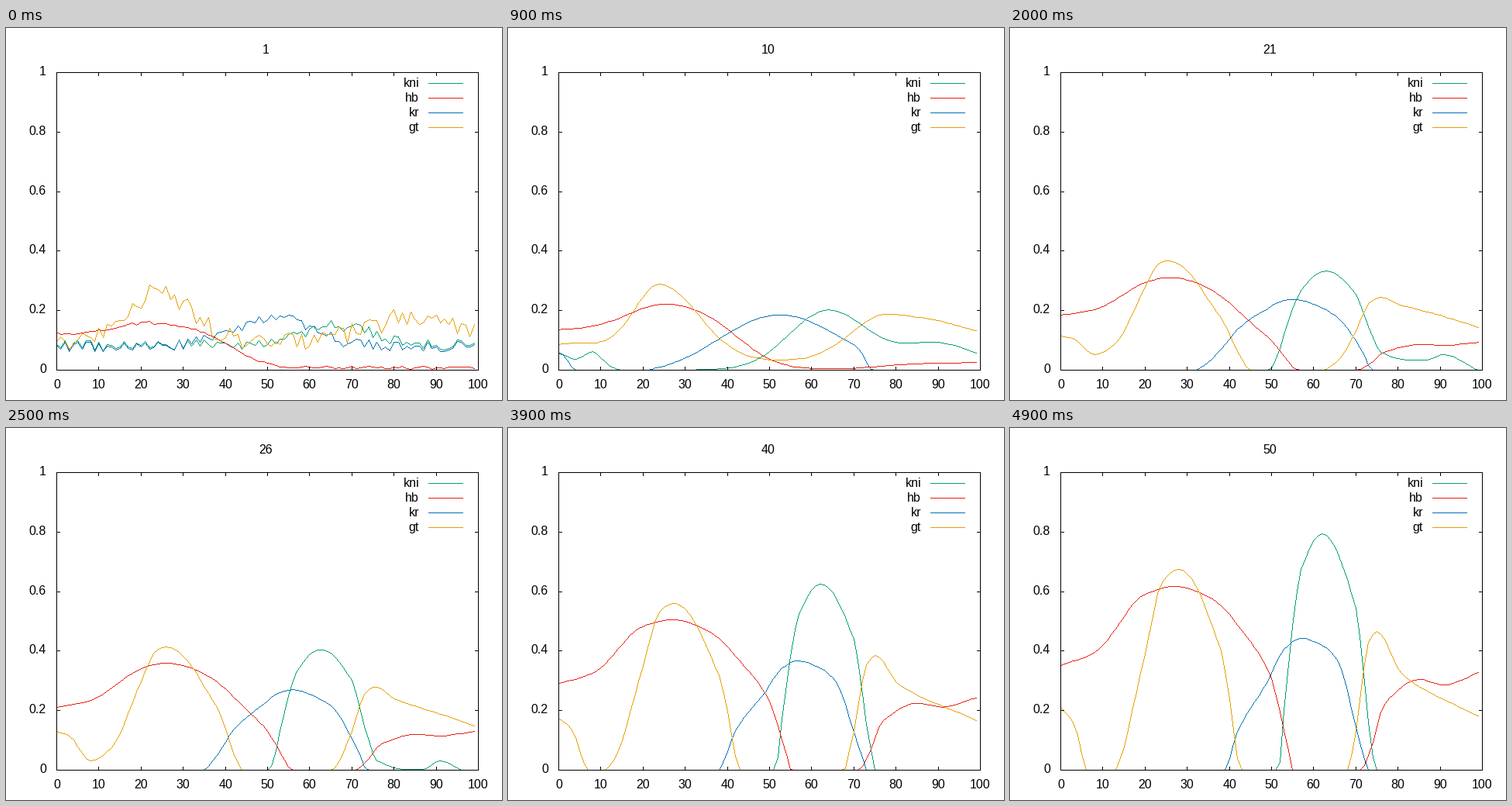
Animation of 640 by 480 pixels, one loop 5 s. Source, as a matplotlib script:

```python
import numpy as np
import matplotlib.pyplot as plt
from matplotlib.animation import FuncAnimation

W, H, DPI = 640, 480, 80
PX = 72 / DPI
LEFT, RIGHT, TOP, BOTTOM = 65, 609, 57, 441
FRAMES, SETTLED = 50, 10
CELLS = np.arange(100)

plt.rcParams["path.simplify"] = False


def bell(centre, left, right):
    d = CELLS - centre
    return np.exp(-(d / np.where(d < 0, left, right)) ** 2)


def fall(centre, width):
    return 1 / (1 + np.exp((CELLS - centre) / width))


def through(*points):
    """Monotone cubic curve through a few (cell, level) points.

    Levels below zero stay hidden, but set how fast a front moves in.
    """
    x, y = np.array(points, float).T
    step = np.diff(x)
    chord = np.diff(y) / step
    a, b = chord[:-1], chord[1:]
    same = a * b > 0
    inner = np.where(same, 2 * a * b / np.where(same, a + b, 1), 0)
    slope = np.concatenate([chord[:1], inner, chord[-1:]])
    i = np.clip(np.searchsorted(x, CELLS, side="right") - 1, 0, len(step) - 1)
    t = (CELLS - x[i]) / step[i]
    bend = (1 - t) * (slope[i] - chord[i]) - t * (slope[i + 1] - chord[i])
    return y[i] + step[i] * t * (chord[i] + (1 - t) * bend)


# Each gene starts noisy, settles into an early profile, then grows to a late one.
GENES = {
    "kni": dict(
        color="#009e73", noise=0.011, seed=5,
        start=0.085 + 0.065 * bell(66, 10, 12),
        early=(0.2 * bell(64, 13, 13) + 0.09 * bell(90, 13, 13)
               + 0.06 * bell(8, 3.5, 3.5) + 0.055 * bell(0, 4, 4)),
        late=through((0, -.25), (40, -.3), (48, -.27), (51, -.1), (54, .355),
                     (57, .675), (62, .793), (70, .545), (73, .16), (76, -.12),
                     (87, -.17), (91, -.08), (99, -.2))),
    "hb": dict(
        color="#e51e10", noise=0.003, seed=8,
        start=0.008 + (0.114 + 0.037 * bell(22, 11, 14)) * fall(43, 3.5),
        early=((0.135 + 0.09 * bell(26, 13, 18)) * fall(45, 4.5)
               + 0.025 * fall(76, -5)),
        late=through((0, .352), (8, .395), (20, .591), (27, .617), (35, .583),
                     (45, .432), (50, .307), (53, .133), (56, -.03), (70, -.03),
                     (73, .05), (77, .225), (85, .305), (91, .286), (99, .328))),
    "kr": dict(
        color="#0072b2", noise=0.011, seed=5,
        start=0.08 + 0.095 * bell(52, 14, 12),
        early=(0.2 * bell(52, 19.5, 22) * fall(73, 0.8)
               + 0.075 * bell(0, 3, 3) - 0.015),
        late=through((0, -.2), (25, -.26), (35, -.15), (39, -.008), (42, .13),
                     (49, .297), (53, .405), (57, .443), (62, .42), (66, .36),
                     (70, .145), (73, -.02), (76, -.2), (99, -.3))),
    "gt": dict(
        color="#e69f00", noise=0.019, seed=21,
        start=0.1 + 0.165 * bell(24, 10, 11) + 0.08 * bell(85, 14, 16),
        early=(0.03 + 0.06 * bell(3, 12, 12) + 0.255 * bell(24, 9, 13)
               + 0.157 * bell(78, 12, 32)),
        late=through((0, .21), (3, .158), (8, -.08), (13, 0), (20, .39),
                     (24, .63), (28, .675), (38, .4), (42, .04), (46, -.23),
                     (58, -.25), (66, -.14), (70, .13), (73, .43), (75, .466),
                     (81, .322), (99, .181))),
}


def diffused_noise(seed, count):
    """White noise that is smoothed and fades out over the first steps."""
    raw = np.random.default_rng(seed).uniform(-1.7, 1.7, 140)
    if count == 1:
        return raw[20:120]
    fade = max(0, 1 - (count - 1) / (SETTLED + 1))
    kernel = np.exp(-np.arange(-20, 21) ** 2 / (1.2 * (count - 1)))
    return fade * np.convolve(raw, kernel / kernel.sum(), "valid")[:100]


def level(gene, count):
    if count < SETTLED:
        a, b, part = gene["start"], gene["early"], (count - 1) / (SETTLED - 1)
    else:
        a, b = gene["early"], gene["late"]
        part = ((count - SETTLED) / (FRAMES - SETTLED)) ** 1.15
    noise = gene["noise"] * diffused_noise(gene["seed"], count)
    return np.maximum(a + (b - a) * part + noise, 0)


def to_x(value):
    return np.floor(LEFT + (RIGHT - LEFT) * value / 100 + 0.5)


def to_y(value):
    return np.floor(BOTTOM - (BOTTOM - TOP) * value + 0.5)


def pixel_chain(xs, ys):
    """One-pixel dashes that step along a polyline, for crisp thin lines."""
    steps = np.maximum(np.abs(np.diff(xs)), np.abs(np.diff(ys)))
    at = np.concatenate([[0], np.cumsum(steps)])
    walk = np.arange(at[-1] + 1)
    px = np.floor(np.interp(walk, at, xs) + 0.5)
    py = np.floor(np.interp(walk, at, ys) + 0.5)
    gaps = np.full_like(px, np.nan)
    return np.column_stack([px, px + 1, gaps]).ravel(), np.repeat(py + 0.5, 3)


fig = plt.figure(figsize=(W / DPI, H / DPI), dpi=DPI, facecolor="white")
ax = fig.add_axes([0, 0, 1, 1])
ax.set(xlim=(0, W), ylim=(H, 0))
ax.axis("off")


def stroke(xs, ys, color="black", zorder=5):
    return ax.plot(*pixel_chain(xs, ys), color=color, lw=PX, snap=False,
                   solid_capstyle="butt", zorder=zorder)[0]


def label(x, baseline, text, align="center"):
    return ax.text(x, baseline, text, ha=align, va="baseline",
                   family="Liberation Sans", size=16 * PX)


stroke([LEFT, RIGHT, RIGHT, LEFT, LEFT], [BOTTOM, BOTTOM, TOP, TOP, BOTTOM])
for value in range(0, 101, 10):
    x = to_x(value)
    stroke([x, x], [BOTTOM, BOTTOM - 4])
    stroke([x, x], [TOP, TOP + 4])
    label(x + 0.5, 465, str(value))
for value in (0, 0.2, 0.4, 0.6, 0.8, 1):
    y = to_y(value)
    stroke([LEFT, LEFT + 4], [y, y])
    stroke([RIGHT, RIGHT - 4], [y, y])
    label(52, y + 4, f"{value:g}", "right")

title = label(335.5, 33, "1")
curves = []
for row, (name, gene) in enumerate(GENES.items()):
    y = 71 + 19 * row
    label(533, y + 5, name, "right")
    stroke([545, 589], [y, y], gene["color"])
    curve = stroke(to_x(CELLS), to_y(level(gene, 1)), gene["color"], zorder=3)
    curves.append((curve, gene))


def update(frame):
    count = frame + 1
    title.set_text(str(count))
    for curve, gene in curves:
        curve.set_data(*pixel_chain(to_x(CELLS), to_y(level(gene, count))))
    return [title] + [curve for curve, _ in curves]


anim = FuncAnimation(fig, update, frames=FRAMES, interval=100, repeat=True,
                     repeat_delay=0, blit=False)
plt.show()
```
